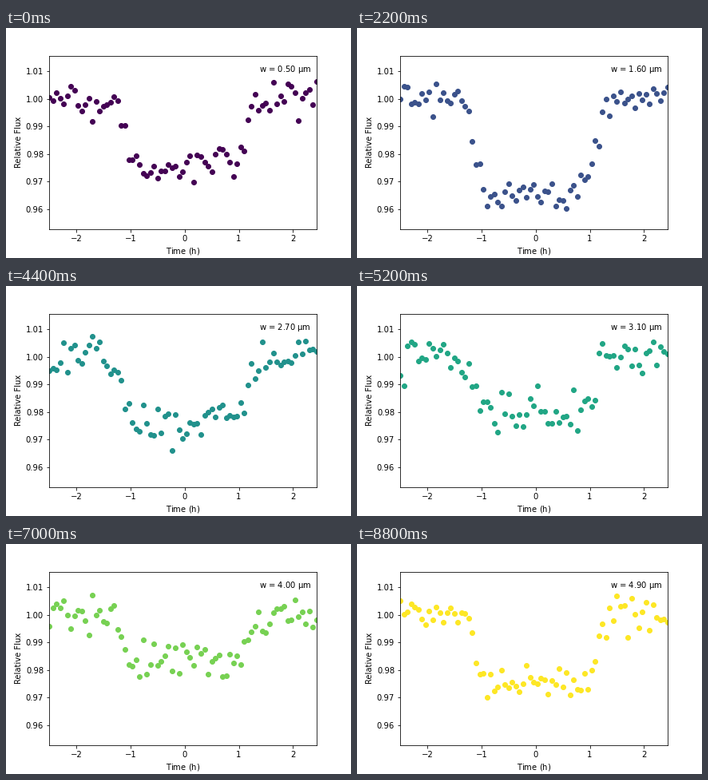
A matplotlib script that plays this animation: 432x288 px, repeating every 9 s.

```python
import matplotlib.pyplot as plt
import numpy as np
from matplotlib.animation import FuncAnimation

FRAMES = 45
INTERVAL = 200

STAR_RADIUS_H = 1.15   # time to cross one stellar radius, in hours
IMPACT = 0.1
LIMB = 0.2
NOISE = 0.0035

time = -2.5 + np.arange(75) * 4 / 60
dist = np.hypot(time / STAR_RADIUS_H, IMPACT)


def overlap(d, k):
    """Part of a unit disc covered by a disc of radius k at distance d."""
    planet = np.arccos(np.clip((d**2 + k**2 - 1) / (2 * d * k), -1, 1))
    star = np.arccos(np.clip((d**2 + 1 - k**2) / (2 * d), -1, 1))
    kite = np.sqrt(np.clip(4 * d**2 - (1 + d**2 - k**2)**2, 0, None)) / 2
    return (k**2 * planet + star - kite) / np.pi


def transit(area):
    """Flux of a limb-darkened star behind a planet of the given area."""
    mu = np.sqrt(1 - np.minimum(dist, 0.95)**2)
    brightness = (1 - LIMB * (1 - mu)) / (1 - LIMB / 3)
    return 1 - brightness * overlap(dist, np.sqrt(area))


def light_curve(i):
    area = 0.0241 + 0.0083 * np.sin(2 * np.pi * i / (FRAMES - 1))
    noise = np.random.default_rng(i).normal(0, NOISE, time.size)
    return transit(area) + np.clip(noise, -0.0105, 0.0105)


fig, ax = plt.subplots(figsize=(6, 4), dpi=72, facecolor="white")
fig.subplots_adjust(left=0.125, right=0.9, bottom=0.125, top=0.88)
ax.set(xlim=(time[0], time[-1]), ylim=(0.95275, 1.01576),
       xlabel=r"Time ($\mathrm{h}$)", ylabel="Relative Flux")

dots, = ax.plot([], [], "o", markersize=6)
label = ax.text(0.98, 0.95, "", transform=ax.transAxes, ha="right", va="top")


def update(i):
    dots.set_data(time, light_curve(i))
    dots.set_color(plt.cm.viridis(i / (FRAMES - 1)))
    label.set_text(rf"w = {0.5 + 0.1 * i:.2f} $\mathrm{{\mu m}}$")
    return dots, label


anim = FuncAnimation(fig, update, frames=FRAMES, interval=INTERVAL,
                     repeat=True, repeat_delay=0)
plt.show()
```
